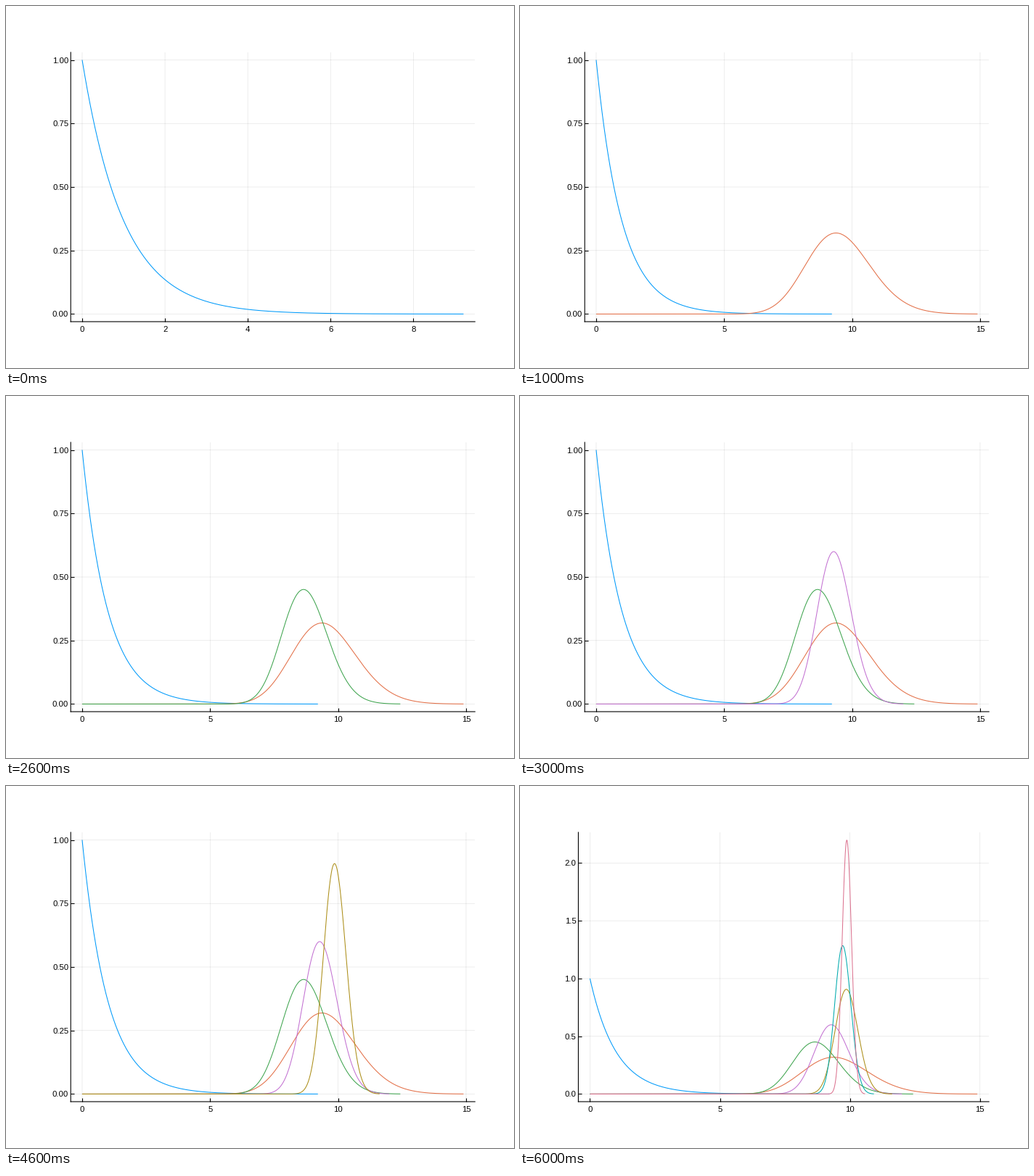
Animation, 700 px wide and 500 px high, one loop 7 s. Source, as a matplotlib script:

```python
import matplotlib.pyplot as plt
import numpy as np
from matplotlib.animation import FuncAnimation

W, H, DPI = 700, 500, 100
TOP, BOTTOM, RIGHT = 64, 436, 646.2
MARGIN = 0.03

plt.rcParams["font.family"] = "Liberation Sans"
plt.rcParams["path.snap"] = False

# Gamma densities: colour, mode, peak height, right end
CURVES = [
    ("#009AFA", 0, 1.0, 9.21),
    ("#E36F47", 9.37, 0.319, 14.9),
    ("#3EA44E", 8.65, 0.451, 12.43),
    ("#C371D2", 9.28, 0.600, 12.0),
    ("#AC8E18", 9.86, 0.907, 11.62),
    ("#00AAAE", 9.72, 1.285, 10.92),
    ("#DC7390", 9.88, 2.200, 10.58),
]


def density(x, mode, peak):
    if mode == 0:
        return peak * np.exp(-x)
    shape = 2 * np.pi * (peak * mode) ** 2
    r = np.maximum(x, 1e-9) / mode
    return peak * np.exp(shape * (np.log(r) - r + 1))


def padded(top):
    return -MARGIN * top, (1 + MARGIN) * top


fig = plt.figure(figsize=(W / DPI, H / DPI), dpi=DPI, facecolor="white")
ax = fig.add_axes([0, 0, 1, 1])
ax.set_axisbelow(True)
ax.grid(color="black", alpha=0.1, linewidth=0.5)
ax.spines[["top", "right"]].set_visible(False)
ax.spines[["left", "bottom"]].set_linewidth(0.8)
ax.tick_params(direction="in", length=3.8, width=0.8, labelsize=8.2)
ax.tick_params(axis="x", pad=4.6)
ax.tick_params(axis="y", pad=2.2)

lines = []
for color, mode, peak, end in CURVES:
    x = np.linspace(0, end, 600)
    lines += ax.plot(x, density(x, mode, peak), color=color, linewidth=0.75,
                     solid_capstyle="butt")


def set_ticks(axis, step, top, fmt):
    ticks = np.arange(0, top * (1 + MARGIN), step)
    axis.set_ticks(ticks, [fmt % t for t in ticks])


def update(i):
    shown = CURVES[:i + 1]
    xmax = max(c[3] for c in shown)
    ymax = max(c[2] for c in shown)
    for k, line in enumerate(lines):
        line.set_visible(k <= i)

    left = 89.2 if ymax <= 1 else 80.4
    ax.set_position([left / W, 1 - BOTTOM / H,
                     (RIGHT - left) / W, (BOTTOM - TOP) / H])
    set_ticks(ax.xaxis, 2 if xmax < 10 else 5, xmax, "%d")
    if ymax <= 1:
        set_ticks(ax.yaxis, 0.25, ymax, "%.2f")
    else:
        set_ticks(ax.yaxis, 0.2 if ymax < 2 else 0.5, ymax, "%.1f")
    ax.set_xlim(padded(xmax))
    ax.set_ylim(padded(ymax))
    return lines


anim = FuncAnimation(fig, update, frames=len(CURVES), interval=1000,
                     repeat=True, repeat_delay=0, blit=False)
plt.show()
```
